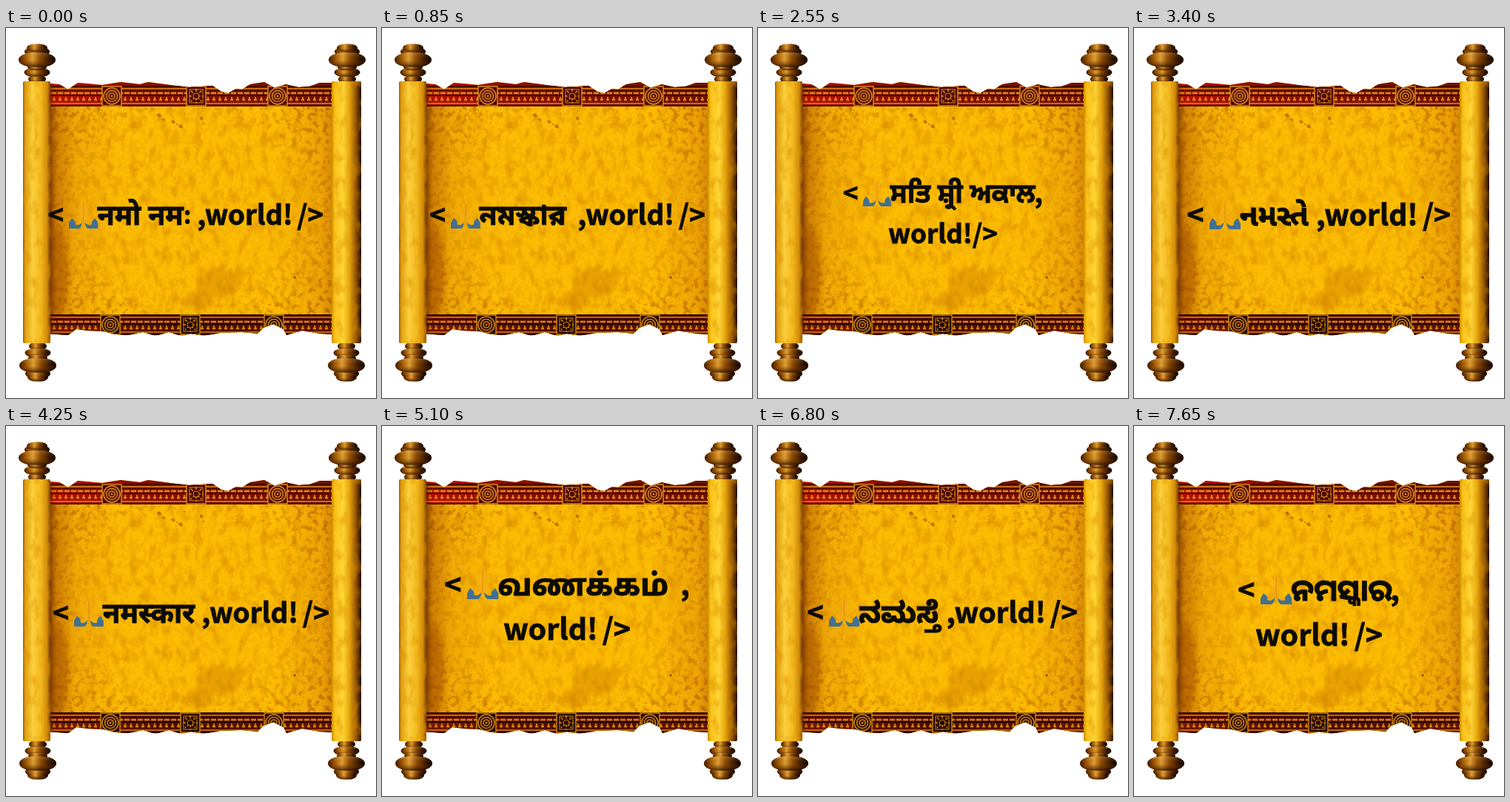
These frames come from a looping animation (500 px wide and 500 px high, 8000 ms). An HTML page:

```html
<!DOCTYPE html>
<html lang="en">
<head>
<meta charset="utf-8">
<title>Hello scroll</title>
<style>
  html, body { margin: 0; width: 100%; height: 100%; overflow: hidden; background: #fff; }
  svg { display: block; width: 100%; height: 100%; }
  text { font: 700 39px "Noto Sans CJK JP", "Noto Sans CJK SC", "Noto Sans CJK", sans-serif; fill: #0c0b06; stroke: #0c0b06; stroke-width: .8px; word-spacing: -.07em; white-space: pre; }
  .word { font-family: "Noto Sans Devanagari", "Noto Sans Gurmukhi", "Noto Sans Tamil", "Noto Sans Kannada", "Noto Sans Oriya", "Noto Sans Bengali", "Noto Sans Gujarati", "Noto Sans Telugu", "Noto Sans", sans-serif; stroke-width: 1px; word-spacing: 0; }
</style>
</head>
<body>
<svg viewBox="0 0 500 500" xmlns="http://www.w3.org/2000/svg">
  <defs>
    <linearGradient id="paper">
      <stop offset="0" stop-color="#8a4300"/><stop offset=".03" stop-color="#c87a04"/>
      <stop offset=".1" stop-color="#efaa05"/><stop offset=".25" stop-color="#fbbc03"/>
      <stop offset=".8" stop-color="#fbbc03"/><stop offset=".95" stop-color="#eda505"/>
      <stop offset="1" stop-color="#cf8205"/>
    </linearGradient>
    <linearGradient id="rollL">
      <stop offset="0" stop-color="#8f5203"/><stop offset=".08" stop-color="#dfa010"/>
      <stop offset=".35" stop-color="#fbcf3c"/><stop offset=".65" stop-color="#f3b91e"/>
      <stop offset=".88" stop-color="#d08a08"/><stop offset="1" stop-color="#6e3600"/>
    </linearGradient>
    <linearGradient id="rollR">
      <stop offset="0" stop-color="#c98c08"/><stop offset=".1" stop-color="#fac216"/>
      <stop offset=".38" stop-color="#ffd638"/><stop offset=".6" stop-color="#e5a60c"/>
      <stop offset=".82" stop-color="#945202"/><stop offset="1" stop-color="#1c0b00"/>
    </linearGradient>
    <linearGradient id="wood">
      <stop offset="0" stop-color="#3a1600"/><stop offset=".2" stop-color="#a45c05"/>
      <stop offset=".38" stop-color="#e0a035"/><stop offset=".58" stop-color="#8c4a02"/>
      <stop offset=".82" stop-color="#381600"/><stop offset="1" stop-color="#0c0400"/>
    </linearGradient>
    <linearGradient id="shade" x2="0" y2="1">
      <stop offset="0" stop-color="#ffdc7a" stop-opacity=".2"/><stop offset=".5" stop-color="#804000" stop-opacity="0"/>
      <stop offset="1" stop-color="#1c0900" stop-opacity=".8"/>
    </linearGradient>
    <linearGradient id="bandTop">
      <stop offset="0" stop-color="#c01000"/><stop offset=".3" stop-color="#8c0f04"/><stop offset="1" stop-color="#6d1204"/>
    </linearGradient>
    <linearGradient id="bandBottom">
      <stop offset="0" stop-color="#7c1603"/><stop offset=".5" stop-color="#4c0b02"/><stop offset="1" stop-color="#681202"/>
    </linearGradient>
    <radialGradient id="rim" r=".62">
      <stop offset=".55" stop-color="#fff" stop-opacity=".12"/><stop offset="1" stop-color="#fff"/>
    </radialGradient>
    <filter id="mottle" color-interpolation-filters="sRGB" x="0" y="0" width="1" height="1">
      <feTurbulence type="fractalNoise" baseFrequency=".09 .05" numOctaves="5" seed="8"/>
      <feColorMatrix values="0 0 0 0 .87  0 0 0 0 .57  0 0 0 0 0  3 0 0 0 -1.35"/>
      <feComposite in2="SourceGraphic" operator="in"/>
    </filter>
    <filter id="stain" color-interpolation-filters="sRGB" x="0" y="0" width="1" height="1">
      <feTurbulence type="fractalNoise" baseFrequency=".14" numOctaves="4" seed="21"/>
      <feColorMatrix values="0 0 0 0 .66  0 0 0 0 .28  0 0 0 0 0  6 0 0 0 -3.1"/>
      <feComposite in2="SourceGraphic" operator="in"/>
    </filter>
    <filter id="blur" x="-.5" width="2"><feGaussianBlur stdDeviation="3"/></filter>
    <clipPath id="sheet">
      <path d="M56 75L72 76 84 83 97 74 130 77 155 73 181 76 192 73 222 77 247 80 279 78 291 86 300 88 311 82 319 83 330 76 349 73 363 81 378 76 395 80 410 79 424 74 444 74V414L424 413 400 409 379 415 375 407 361 400 348 405 340 413 318 411 290 412 266 416 250 413 237 416 220 411 202 416 185 411 165 415 148 414 132 410 110 409 95 407 84 415 56 413Z"/>
    </clipPath>
    <g id="cuff">
      <path d="M21-39Q17-40 16-29L12-14Q11-6 17-4L21-8Z" fill="#f5ad18" opacity=".6"/>
      <path d="M4-15L0-8V0H15Q19-3 19-9Q14-3 9-6Q11-10 4-15Z" fill="#416f94"/>
    </g>
    <g id="hands">
      <use href="#cuff"/><use href="#cuff" transform="matrix(-1 0 0 1 42 0)"/>
      <path d="M21-37V-8" stroke="#d88c0c" fill="none"/>
    </g>
  </defs>
  <g id="scroll"></g>
  <g id="greeting"></g>
</svg>
<script>
const byId = id => document.getElementById(id);
const rect = (x, y, w, h, fill, more = '') =>
  `<rect x="${x}" y="${y}" width="${w}" height="${h}" fill="${fill}" ${more}/>`;
const line = (x1, x2, y, colour, width, dash = '') =>
  `<path d="M${x1} ${y}H${x2}" stroke="${colour}" stroke-width="${width}" stroke-dasharray="${dash}"/>`;
const ellipse = (x, y, rx, ry, fill, more = '') =>
  `<ellipse cx="${x}" cy="${y}" rx="${rx}" ry="${ry}" fill="${fill}" ${more}/>`;

function medal(x, y, round, gold, dark) {
  let art = rect(x - 13, y - 13, 26, 26, dark, `stroke="${gold}" stroke-width="1.5"`);
  if (round) {
    for (const r of [11, 7.5, 4]) art += ellipse(x, y, r, r, 'none', `stroke="${gold}" stroke-width="1.6"`);
    return art + ellipse(x, y, 1.5, 1.5, gold);
  }
  for (let a = 0; a < 180; a += 45)
    art += `<path d="M${x - 10} ${y}H${x + 10}" stroke="${gold}" stroke-width="1.6" stroke-dasharray="4 2" transform="rotate(${a} ${x} ${y})"/>`;
  return art + rect(x - 9, y - 9, 18, 18, 'none', `stroke="${gold}" stroke-width="1"`)
    + ellipse(x, y, 4, 4, dark, `stroke="${gold}"`);
}

function band(y, top, fill, gold, dark, centres) {
  let art = rect(55, top, 390, y + 14 - top, fill)
    + line(55, 445, y - 13, dark, 2) + line(55, 445, y - 10, gold, 1.4)
    + line(55, 445, y - 7.5, dark, 1.6) + line(61, 445, y - 4, gold, 2.6, '7 2')
    + line(55, 445, y - 1, dark, 2)
    + line(64, 445, y + 2.5, gold, 2.5, '2 6') + line(63, 445, y + 5, gold, 2.6, '4 4')
    + line(55, 445, y + 10, gold, 1.3) + line(55, 445, y + 13, dark, 2);
  centres.forEach((x, i) => art += medal(x, y, i !== 1, gold, dark));
  return art;
}

// A turned knob, listed from the roll outwards; dir is -1 for the top.
function finial(x, y, dir) {
  const parts = [[4, 12, 6], [13, 17.5, 5.5], [20, 13, 4], [41, 17, 6], [46, 14, 5.5], [30, 25, 9.5]];
  return parts.map(([d, rx, ry]) => {
    const at = y + dir * d;
    return ['wood', 'shade'].map(paint =>
      rect(x - rx, at - ry, rx * 2, ry * 2, `url(#${paint})`, `rx="${Math.min(rx, ry * 2)}" ry="${ry}"`)).join('');
  }).join('');
}

const roll = (x, width, fill) => rect(x, 72, width, 354, fill, 'rx="2"')
  + rect(x, 72, width, 354, '#fff', 'filter="url(#mottle)" opacity=".5"');

const spots = [[207, 118, 3], [213, 124, 2], [226, 127, 2.5], [236, 133, 3], [231, 130, 1.3],
  [264, 122, 2.5], [241, 116, 1.2], [267, 129, 1.5]];

byId('scroll').innerHTML = '<g clip-path="url(#sheet)">'
  + rect(55, 70, 390, 350, 'url(#paper)')
  + rect(55, 70, 390, 350, '#fff', 'filter="url(#mottle)" opacity=".65"')
  + rect(55, 70, 390, 350, 'url(#rim)', 'filter="url(#stain)" opacity=".6"')
  + ellipse(288, 345, 28, 20, '#cb7d04', 'opacity=".4" filter="url(#blur)"')
  + ellipse(260, 368, 16, 13, '#cb7d04', 'opacity=".45" filter="url(#blur)"')
  + ellipse(70, 330, 14, 60, '#9a4a00', 'opacity=".4" filter="url(#blur)"')
  + spots.map(([x, y, r]) => ellipse(x, y, r, r * .7, '#a85a05', `opacity=".75" transform="rotate(35 ${x} ${y})"`)).join('')
  + ellipse(390, 337, 1, 1.5, '#432000')
  + band(92, 70, 'url(#bandTop)', '#e08a14', '#4b0602', [143, 257, 367])
  + band(401, 387, 'url(#bandBottom)', '#cf860a', '#260400', [141, 249, 362])
  + rect(54, 70, 9, 350, '#5c2500', 'opacity=".55" filter="url(#blur)"')
  + '</g>'
  + [[42, 73, -1], [461, 73, -1], [43, 426, 1], [460, 426, 1]].map(p => finial(...p)).join('')
  + roll(23, 37, 'url(#rollL)') + roll(440, 40, 'url(#rollR)');

// size, left edge of the hands, word, right edge, baseline, second line, its baseline
const greetings = [
  [36.6, 85, 'नमो नमः', 429, 266],
  [37, 93, 'নমস্কার', 437, 266],
  [39, 102, 'नमस्ते', 428, 267],
  [35, 142, 'ਸਤਿ ਸ਼੍ਰੀ ਅਕਾਲ', 385, 236, 'world!/>', 291],
  [39, 102, 'નમસ્તે', 428, 267],
  [37, 92, 'नमस्कार', 437, 266],
  [39.3, 115, 'வணக்கம்', 416, 229, 'world! />', 289],
  [39.3, 125, 'నమస్కారం', 390, 229, 'world! />', 289],
  [38, 96, 'ನಮಸ್ತೆ', 432, 266],
  [39.3, 171, 'ନମସ୍କାର', 359, 236, 'world! />', 297],
];

const label = (text, x, y, size, anchor = 'start', cls = '') =>
  `<text x="${x}" y="${y}" style="font-size:${size}px" text-anchor="${anchor}" class="${cls}">${text.replace(/</g, '&lt;')}</text>`;

function greet([size, left, word, right, y, second, y2]) {
  return label('<', left - size * .78, y, size)
    + `<use href="#hands" transform="translate(${left} ${y + 5}) scale(${size / 39})"/>`
    + label(word, left + size * 1.05, y, size * 1.03, 'start', 'word')
    + label(second ? ',' : ',world! />', right, y, size, 'end')
    + (second ? label(second, 250, y2, size, 'middle') : '');
}

let shown = -1;
function draw() {
  const step = Math.floor(performance.now() % 8000 / 850);
  if (step !== shown) byId('greeting').innerHTML = greet(greetings[shown = step]);
  requestAnimationFrame(draw);
}
draw();
</script>
</body>
</html>
```
